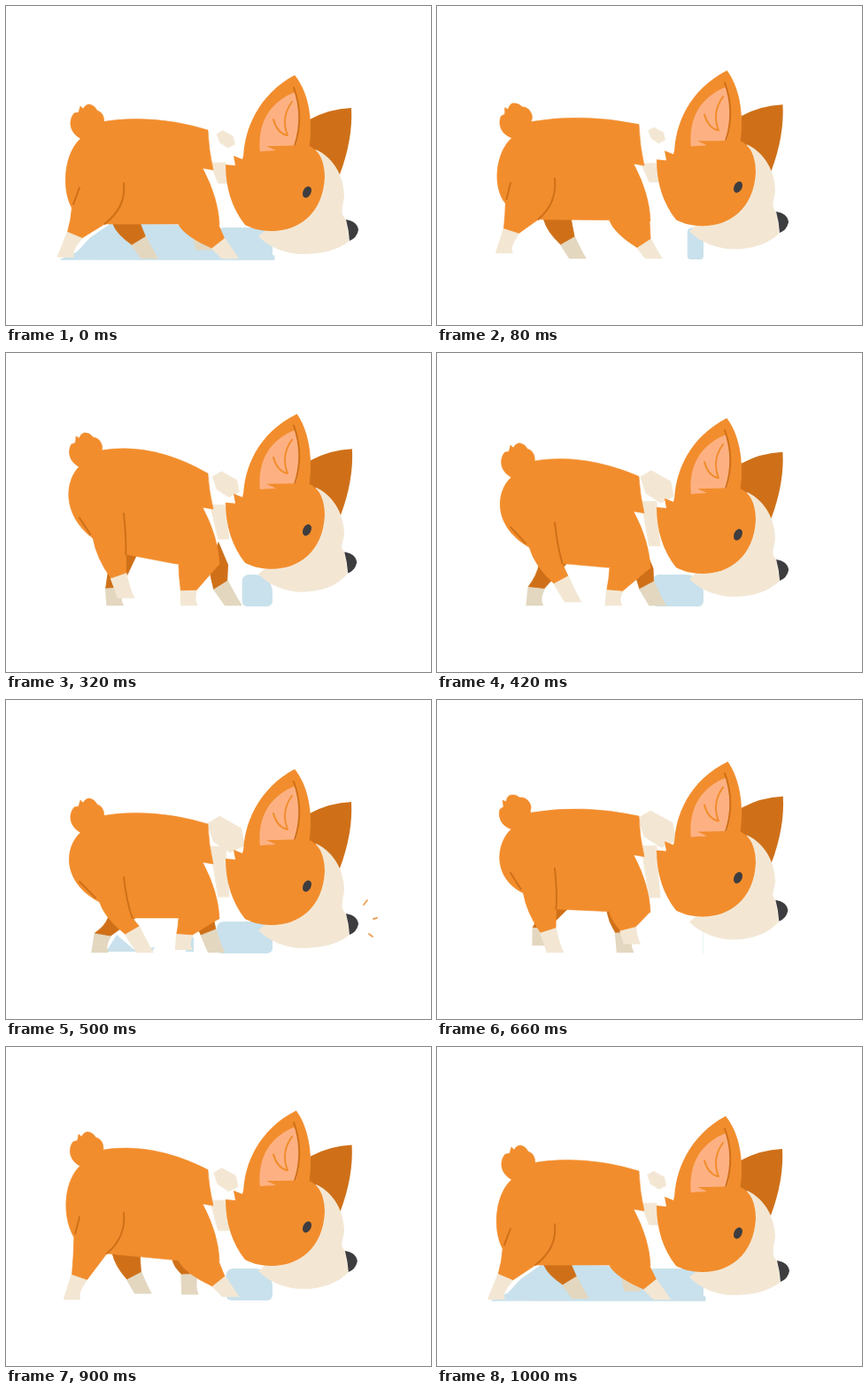
These frames come from a looping animation (480x360 px, 1020 ms). An HTML page with a canvas:

```html
<!DOCTYPE html>
<html lang="en">
<head>
<meta charset="utf-8">
<title>Walking corgi</title>
<style>
html, body { margin: 0; width: 100%; height: 100%; overflow: hidden; background: #fff; }
canvas { display: block; }
</style>
</head>
<body>
<canvas id="stage" width="480" height="360"></canvas>
<script>
const ctx = document.getElementById('stage').getContext('2d');
const { PI, sin, cos, max, min, hypot } = Math;
const LOOP = 1020, STEP = 510, GROUND = 284.5;
const ORANGE = '#f28d2d', BROWN = '#cf7019', CREAM = '#f3e7d4', SAND = '#e3d7c0',
      PINK = '#fdb183', BLUE = '#c9e1ec', DARK = '#3d3d40';

// Foot swings around mid by amp; the shank is upright at rest; knees follow the foot
const nearHind = { mid: 112, amp: 45, phase: .15, rest: 105, shank: 25, back: 90, front: 127, follow: .35, rise: 18 };
const farHind = { mid: 134, amp: 28, phase: PI, rest: 118, shank: 20, back: 118, front: 149, follow: .1, rise: 0 };
const nearFore = { mid: 227, amp: 28, phase: PI + .4, rest: 205, shank: 17, back: 195, front: 240, follow: 0, rise: 0 };
const farFore = { mid: 230, amp: 27, phase: 1.35, rest: 205, shank: 23, back: 207, front: 228, follow: .85, rise: 0 };

function fill(d, color, edge = 0) {
  const path = new Path2D(d);
  ctx.fillStyle = color;
  ctx.fill(path);
  if (edge) line(path, color, edge);
}

function line(d, color, width = 2) {
  ctx.strokeStyle = color;
  ctx.lineWidth = width;
  ctx.stroke(new Path2D(d));
}

function at(x, y, paint, angle = 0, scale = 1) {
  ctx.save();
  ctx.translate(x, y);
  ctx.rotate(angle);
  ctx.scale(scale, scale);
  paint();
  ctx.restore();
}

function limbPose(limb, turn, hipY) {
  const p = turn + limb.phase;
  const swing = -limb.amp * cos(p);
  const x = limb.mid + swing, y = GROUND - 10 * max(0, sin(p));
  const lean = (limb.rest - x) * .28;
  const k = 9 / hypot(lean, limb.shank);   // half the ankle's width
  const ax = x + lean, ay = y - limb.shank, dx = limb.shank * k, dy = lean * k;
  return {
    x, y, hipY,
    back: [ax - dx, ay - dy], front: [ax + dx, ay + dy],
    kneeBack: [limb.back + limb.follow * swing, hipY - limb.rise],
    kneeFront: [limb.front + limb.follow * swing, hipY],
  };
}

function drawLeg(pose, color, pawColor) {
  const { x, y, hipY, back, front, kneeBack, kneeFront } = pose;
  fill(`M${back}L${x - 9} ${y}L${x + 9} ${y}Q${x + 5} ${y - 6} ${front}Z`, pawColor, 1.5);
  fill(`M${kneeBack}Q${kneeBack[0] * .8 + back[0] * .2} ${(kneeBack[1] + back[1]) / 2} ${back}
    L${front}L${kneeFront}L${(kneeBack[0] + kneeFront[0]) / 2} ${hipY - 25}Z`, color, .8);
}

function drawBody(rump, shoulder, lift, belly, chestY, hind) {
  const top = 131 - 21 * rump, joint = 149 - 23 * rump, neck = 140 - 9 * shoulder, notch = 183 - 10 * lift;
  const { kneeBack: kb, kneeFront: kf } = hind;
  fill(`M85 ${joint}L107 ${top}Q165 ${top - 10} 228 ${neck}Q229 ${notch - 20} 234 ${notch + 2}L222 ${notch}
    Q240 ${notch + 34} 241 ${chestY}L192 ${chestY - 1} ${kf}L${kb}
    C62 ${joint + 56} 66 ${joint + 16} 85 ${joint}Z`, ORANGE, .6);
  const crease = belly - 41;
  line(`M133 ${crease - 5}Q136 ${crease + 22} ${kf}`, BROWN);
  line(`M83 ${crease}L${83 + (kb[0] - 83) * .8} ${crease + (kb[1] - crease) * .8}`, BROWN);
}

function drawTail() {
  fill(`M-12 10C-27 2 -26 -12 -20 -19L-15 -20 -13 -27 -10 -24Q-7 -29 -3 -29Q3 -28 6 -22
    C14 -20 16 -8 11 -4L8 10Z`, ORANGE, .6);
}

function drawHead(lift) {
  const n = -7 * lift, tip = 326 + 3 * lift, nx = 384 - 2 * lift;
  // Far ear lags behind the head
  at(lift, 4 * lift, () => fill('M343 128Q365 116 390 115Q392 150 377 190L340 168Z', BROWN));
  // Muzzle and nose
  fill(`M350 162C372 172 382 195 382 215C380 228 377 ${235 + n} ${nx} ${241 + n}
    L${nx + 4} ${265 + n}C375 ${276 + n / 2} 355 280 335 280C315 280 297 272 285 260L294 252 310 245Z`, CREAM);
  fill(`M${nx} ${241 + n}Q${nx + 13} ${243 + n} ${nx + 14} ${253 + n}
    Q${nx + 12} ${262 + n} ${nx + 4} ${265 + n}Q${nx + 3} ${252 + n} ${nx} ${241 + n}Z`, DARK);
  // Near ear
  fill(`M268 174C268 140 285 100 ${tip} ${78 + lift}C340 95 348 125 342 162Z`, ORANGE);
  fill('M287 166C283 130 300 107 327 97C333 115 333 140 327 160Z', PINK);
  line('M325 92Q337 125 326 158', BROWN);
  line('M302 128Q306 143 317 146M323 108Q310 126 318 146', ORANGE);
  // Face
  fill(`M248 179L259 180 257 169 267 173 268 169C278 165 285 164 305 163L294 158
    C315 158 330 157 342 158C356 163 360 180 360 193C358 235 330 254 300 254
    C285 254 276 250 270 247C255 228 248 205 248 179Z`, ORANGE);
  ctx.fillStyle = DARK;
  ctx.beginPath();
  ctx.ellipse(340, 210, 4.5, 6.8, .45, 0, 7);
  ctx.fill();
}

function drawFur(turn, shoulder) {
  const size = 1 - .4 * cos(turn - .5);
  const top = 188 - 17 * size, bottom = 200 + 32 * (size - .65);
  fill(`M231 ${top}L248 ${top} 249 190 252 ${bottom} 240 ${bottom}Z`, CREAM, 1);
  at(248, 149 - 6 * shoulder, () => fill('M-15 -7L-5 -13 13 -3 16 11 4 17 -10 8Z', CREAM, 1), 0, size);
}

function drawPuddle(t, shoulder) {
  if (t < 70 || t > 960)
    fill('M62 286L80 278 95 262 118 246 192 247 240 262 303 282 303 286Z', BLUE, 1);
  if (t > 450 && t < 550)
    fill('M113 284L125 265 145 282 168 279 165 284ZM203 284L206 264 212 268 212 284Z', BLUE);
  const width = 63 * (1 - shoulder);
  ctx.fillStyle = BLUE;
  ctx.beginPath();
  ctx.roundRect(301 - width, 250, width, 36, [8, 20, 6, 6]);
  ctx.fill();
}

function draw(t) {
  const turn = 2 * PI * t / LOOP;
  // One bounce per step: the shoulder peaks early, the head midway, the rump late
  const u = min(1, t % STEP / 490);
  const bump = skew => sin(PI * u ** skew) ** 2;
  const rump = bump(1.65), shoulder = bump(.63), lift = sin(PI * u);
  const belly = 246 - 10 * lift - 10 * rump, chestY = 247 - 9 * lift;
  const hind = limbPose(nearHind, turn, belly);

  ctx.fillStyle = '#fff';
  ctx.fillRect(0, 0, 480, 360);
  ctx.lineCap = ctx.lineJoin = 'round';

  drawPuddle(t, shoulder);
  drawLeg(limbPose(farHind, turn, belly), BROWN, SAND);
  drawLeg(limbPose(farFore, turn, chestY), BROWN, SAND);
  drawFur(turn, shoulder);
  drawLeg(hind, ORANGE, CREAM);
  drawLeg(limbPose(nearFore, turn, chestY), ORANGE, CREAM);
  at(97, 140 - 22 * rump - 4 * shoulder * (1 - rump), drawTail, -.42 * shoulder);
  drawBody(rump, shoulder, lift, belly, chestY, hind);
  at(0, -11.5 * lift, () => drawHead(lift));

  if (t > 450 && t < 590) {
    const d = (t - 500) / 40;
    line(`M${404 + d} ${231 - d}l4 -5M${415 + d} 247l4 -1M${410 + d} ${264 + d}l4 3`, '#eda25c');
  }
}

const start = performance.now();
function tick() {
  const t = (performance.now() - start) % LOOP;
  draw(Math.floor(t / 20) * 20);
  requestAnimationFrame(tick);
}
tick();
</script>
</body>
</html>
```
